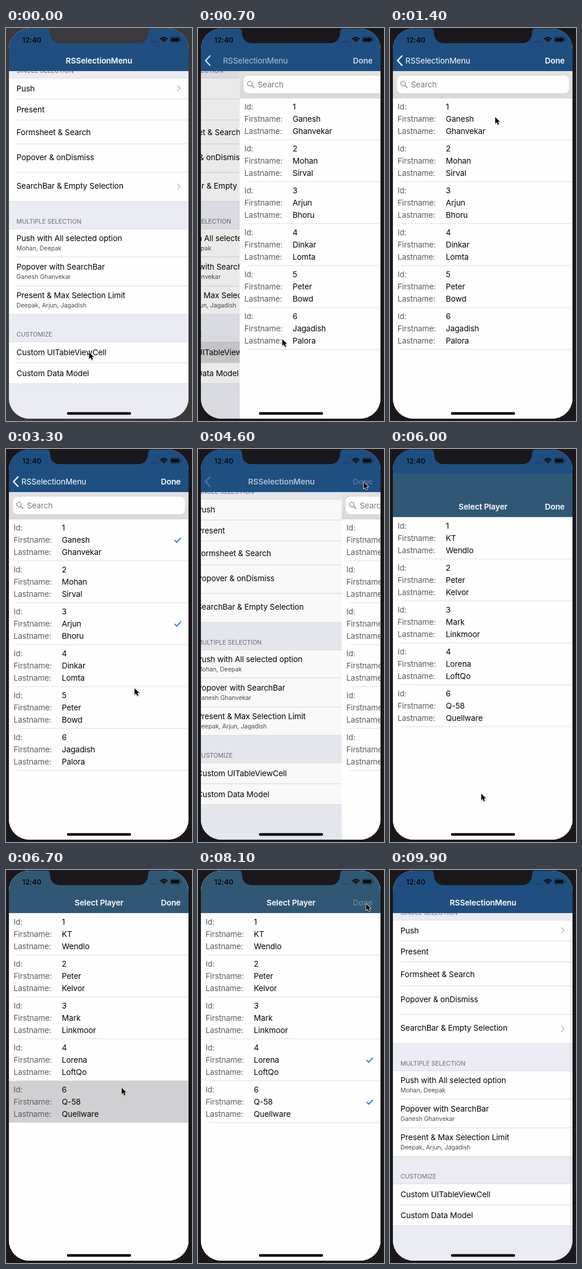
Animation, 320 px wide and 675 px high, one loop 10 s. Source, as an HTML page with a canvas:

```html
<!DOCTYPE html>
<html lang="en">
<head>
<meta charset="utf-8">
<title>Selection menu demo</title>
<style>
html, body { margin: 0; width: 100%; height: 100%; overflow: hidden; background: #1a181b; }
canvas { display: block; width: 320px; height: 675px; }
</style>
</head>
<body>
<canvas id="stage"></canvas>
<script>
const W = 320, H = 675, LOOP = 10000, STEP = 100;
const L = 5, R = 314, TOP = 1, BOTTOM = 671, NAV = 74;
const FONT = 'Inter, Roboto, "Liberation Sans", sans-serif';
const GROUP = '#ebebf3', LINE = '#dcdce0', BLUE = '#1e4f80', MODAL_BLUE = '#305874';

const canvas = document.getElementById('stage');
const ctx = canvas.getContext('2d');
const dpr = window.devicePixelRatio || 1;
canvas.width = W * dpr;
canvas.height = H * dpr;

const players = [
  [1, 'Ganesh', 'Ghanvekar'], [2, 'Mohan', 'Sirval'], [3, 'Arjun', 'Bhoru'],
  [4, 'Dinkar', 'Lomta'], [5, 'Peter', 'Bowd'], [6, 'Jagadish', 'Palora']
];
const guests = [
  [1, 'KT', 'Wendlo'], [2, 'Peter', 'Kelvor'], [3, 'Mark', 'Linkmoor'],
  [4, 'Lorena', 'LoftQo'], [6, 'Q-58', 'Quellware']
];
const menu = [
  { top: 86, ends: [122, 158, 199, 248, 298], rows: [
    ['Push', 104], ['Present', 140], ['Formsheet & Search', 179],
    ['Popover & onDismiss', 222], ['SearchBar & Empty Selection', 271.5]] },
  { head: 'MULTIPLE SELECTION', top: 345, ends: [393, 443, 492], rows: [
    ['Push with All selected option', 361, 'Mohan, Deepak'],
    ['Popover with SearchBar', 410, 'Ganesh Ghanvekar'],
    ['Present & Max Selection Limit', 459.5, 'Deepak, Arjun, Jagadish']] },
  { head: 'CUSTOMIZE', top: 539, ends: [575, 611], rows: [
    ['Custom UITableViewCell', 557], ['Custom Data Model', 593.5]] }
];
// Pointer stops: time, x, y
const path = [
  [0, 143, 557], [600, 143, 557], [1300, 181, 153], [1900, 182, 154], [2400, 204, 298],
  [2800, 206, 300], [3200, 221, 411], [3500, 222, 411], [4000, 284, 56], [4600, 285, 57],
  [5200, 153, 569], [5400, 154, 572], [5600, 156, 592], [6000, 157, 592], [6500, 199, 374],
  [6900, 199, 374], [7200, 202, 325], [7500, 203, 325], [7900, 289, 58], [8600, 290, 58],
  [9200, 334, 40], [10000, 334, 40]
];

const clamp = v => Math.max(0, Math.min(1, v));
const during = (t, a, b) => t >= a && t < b;
const smooth = p => p * p * (3 - 2 * p);
const glide = (t, start, len) => {
  const p = clamp((t - start) / len);
  return 1 - Math.pow(1 - p, 3);
};

function rect(x, y, w, h, color) {
  ctx.fillStyle = color;
  ctx.fillRect(x, y, w, h);
}

function round(x, y, w, h, r, color) {
  ctx.beginPath();
  ctx.roundRect(x, y, w, h, r);
  ctx.fillStyle = color;
  ctx.fill();
}

function stroke(points, color, width) {
  ctx.beginPath();
  points.forEach(([x, y]) => ctx.lineTo(x, y));
  ctx.strokeStyle = color;
  ctx.lineWidth = width;
  ctx.stroke();
}

// y is the middle of the capital letters
function text(s, x, y, o = {}) {
  const { size = 13.6, color = '#060608', weight = 400, gap = -0.12, align = 'left' } = o;
  ctx.font = `${weight} ${size}px ${FONT}`;
  ctx.letterSpacing = gap + 'px';
  ctx.textAlign = align;
  ctx.fillStyle = color;
  ctx.fillText(s, x, y + size * 0.364);
}

const small = (s, x, y, color) => text(s, x, y, { size: 10.5, gap: -0.04, color });
const navText = (s, x, align) => text(s, x, 56, { weight: 600, color: '#fff', align });

function faded(alpha, draw) {
  if (alpha <= 0) return;
  ctx.save();
  ctx.globalAlpha *= alpha;
  draw();
  ctx.restore();
}

function moved(x, y, draw) {
  ctx.save();
  ctx.translate(x, y);
  draw();
  ctx.restore();
}

function drawMenu(t) {
  rect(L, NAV, R - L, BOTTOM - NAV, GROUP);
  small('SINGLE SELECTION', 18, 73, '#6c6c73');
  for (const { head, top, ends, rows } of menu) {
    const last = ends[ends.length - 1];
    if (head) small(head, 18, top - 12.5, '#6c6c73');
    rect(L, top, R - L, last - top, '#fefefe');
    if (head === 'CUSTOMIZE') {
      if (during(t, 300, 1000)) rect(L, 539, R - L, 36, '#d4d4d6');
      if (during(t, 5600, 6200)) rect(L, 575, R - L, 36, '#d4d4d6');
    }
    rect(L, top - 0.5, R - L, 1, LINE);
    ends.forEach(y => {
      const x = y === last ? L : 18;
      rect(x, y - 0.5, R - x, 1, LINE);
    });
    rows.forEach(([title, y, sub]) => {
      text(title, 18, y);
      if (sub) small(sub, 18, y + 17, '#4e4e52');
    });
  }
  [103.5, 272.5].forEach(y => stroke([[295, y - 4.7], [299.5, y], [295, y + 4.7]], '#bcbcc1', 1.5));
}

function drawRows(list, top, checks, lit) {
  list.forEach((row, i) => {
    const y = top + i * 72;
    if (i === lit) rect(L, y, R - L, 72, '#d0cfd1');
    ['Id:', 'Firstname:', 'Lastname:'].forEach((label, j) => {
      text(label, 13, y + 15.5 + j * 21, { color: '#5e5e61', gap: -0.18 });
      text(String(row[j]), 96, y + 15.5 + j * 21);
    });
    if (i !== lit) rect(19, y + 71.5, R - 19, 1, '#dedee1');
    if (checks.includes(i)) {
      stroke([[290.5, y + 36.8], [293.8, y + 40.1], [300.5, y + 33]], '#0b74e5', 1.8);
    }
  });
}

function drawPlayers(t) {
  rect(L, NAV, R - L, BOTTOM - NAV, '#fefefe');
  const shade = ctx.createLinearGradient(0, NAV, 0, 120);
  shade.addColorStop(0, '#e2e1e3');
  shade.addColorStop(1, '#d9d9db');
  rect(L, NAV, R - L, 46, shade);
  rect(L, 119.5, R - L, 1, '#c2c2c5');
  round(12, 82, 296, 30, 8, '#fefefe');
  ctx.beginPath();
  ctx.arc(22.5, 95.5, 4, 0, Math.PI * 2);
  ctx.strokeStyle = '#77777c';
  ctx.lineWidth = 1.1;
  ctx.stroke();
  stroke([[25.5, 98.5], [29.5, 102.5]], '#77777c', 1.2);
  text('Search', 36, 97, { color: '#7b7b80' });

  const checks = [];
  if (t >= 1700) checks.push(0);
  if (t >= 2700) checks.push(2);
  const lit = during(t, 1500, 1700) ? 0 : during(t, 2500, 2700) ? 2 : -1;
  drawRows(players, 120, checks, lit);
}

function drawNav(t, p) {
  rect(L, TOP, R - L, NAV - TOP, BLUE);
  faded(clamp(1 - p * 1.6), () => navText('RSSelectionMenu', 160 - p * 76, 'center'));
  faded(clamp(p * 1.6 - 0.6), () => {
    text('RSSelectionMenu', 26.5 + (1 - p) * 76, 56, { color: '#fff' });
  });
  faded(p, () => {
    stroke([[20.5, 48], [13, 56], [20.5, 64]], '#fff', 2.4);
    faded(during(t, 4200, 4400) ? 0.25 : 1, () => navText('Done', 300.5, 'right'));
  });
}

function drawModal(t) {
  rect(L, TOP, R - L, BOTTOM - TOP, '#fefefe');
  const checks = [];
  if (t >= 6900) checks.push(4);
  if (t >= 7500) checks.push(3);
  const lit = during(t, 6600, 6900) ? 4 : during(t, 7300, 7500) ? 3 : -1;
  drawRows(guests, NAV, checks, lit);
  rect(L, TOP, R - L, NAV - TOP, MODAL_BLUE);
  navText('Select Player', 160, 'center');
  faded(during(t, 8000, 8300) ? 0.25 : 1, () => navText('Done', 300.5, 'right'));
}

function drawNotch(color) {
  ctx.beginPath();
  ctx.moveTo(70, 0);
  ctx.quadraticCurveTo(75.5, 1, 75.5, 7);
  ctx.bezierCurveTo(75.5, 19, 82, 26, 93, 26);
  ctx.lineTo(227, 26);
  ctx.bezierCurveTo(238, 26, 244.5, 19, 244.5, 7);
  ctx.quadraticCurveTo(244.5, 1, 250, 0);
  ctx.closePath();
  ctx.fillStyle = color;
  ctx.fill();
}

function drawStatus() {
  const ink = '#07090c';
  text('12:40', 28, 20.5, { size: 12.3, weight: 600, color: ink, gap: -0.05 });
  for (let i = 0; i < 4; i++) round(248.5 + i * 3.4, 22.5, 2, 2, 1, 'rgba(5,15,30,.4)');
  ctx.lineWidth = 1.9;
  ctx.strokeStyle = ink;
  [8.3, 5.3].forEach(r => {
    ctx.beginPath();
    ctx.arc(271.5, 24.5, r, -Math.PI * 0.75, -Math.PI * 0.25);
    ctx.stroke();
  });
  ctx.beginPath();
  ctx.moveTo(271.5, 24.5);
  ctx.arc(271.5, 24.5, 3.2, -Math.PI * 0.75, -Math.PI * 0.25);
  ctx.fillStyle = ink;
  ctx.fill();
  ctx.beginPath();
  ctx.roundRect(282.5, 15.5, 17, 9, 2.6);
  ctx.lineWidth = 0.9;
  ctx.strokeStyle = 'rgba(5,10,18,.6)';
  ctx.stroke();
  round(284, 17, 14, 6, 1.4, ink);
  round(300.7, 18.3, 1.3, 3.4, 0.7, 'rgba(5,10,18,.6)');
}

function drawPointer(t) {
  const i = path.findIndex(stop => stop[0] > t);
  const [t0, x0, y0] = path[i - 1], [t1, x1, y1] = path[i];
  const p = smooth((t - t0) / (t1 - t0));
  moved(x0 + (x1 - x0) * p, y0 + (y1 - y0) * p, () => {
    ctx.scale(0.86, 0.86);
    ctx.beginPath();
    [[0, 0], [0, 13], [3, 10.2], [5.2, 15], [7.6, 14], [5.4, 9.3], [9.4, 9.2]]
      .forEach(([x, y]) => ctx.lineTo(x, y));
    ctx.closePath();
    ctx.shadowColor = 'rgba(0,0,0,.3)';
    ctx.shadowBlur = 2 * dpr;
    ctx.shadowOffsetY = dpr;
    ctx.strokeStyle = '#fff';
    ctx.lineWidth = 1.8;
    ctx.stroke();
    ctx.shadowColor = 'transparent';
    ctx.fillStyle = '#050505';
    ctx.fill();
  });
}

function draw(t) {
  const push = t < 3000 ? glide(t, 500, 500) : 1 - glide(t, 4400, 500);
  const rise = t < 7500 ? glide(t, 5700, 500) : 1 - glide(t, 8300, 500);
  const bar = t < 7000
    ? clamp((t - 4800) / 200) * clamp((6000 - t) / 300)
    : clamp((t - 8700) / 200) * (1 - 0.85 * clamp((t - 9300) / 400));
  const bezel = t < 300 ? '#3a393c' : '#1a181b';
  const width = R - L;

  ctx.setTransform(dpr, 0, 0, dpr, 0, 0);
  ctx.lineCap = 'round';
  ctx.lineJoin = 'round';
  rect(0, 0, W, H, bezel);

  ctx.save();
  ctx.beginPath();
  ctx.roundRect(L, TOP, width, BOTTOM - TOP, 35);
  ctx.clip();
  rect(L, TOP, width, BOTTOM - TOP, GROUP);
  if (push < 1) moved(-push * width * 0.3, 0, () => drawMenu(t));
  if (push > 0) {
    if (push < 1) rect(L, NAV, width, BOTTOM - NAV, `rgba(0,0,0,${push * 0.1})`);
    moved((1 - push) * width, 0, () => drawPlayers(t));
  }
  faded(bar, () => round(310, 103.5, 2.4, 541, 1.2, '#909095'));
  drawNav(t, push);
  if (rise > 0) moved(0, (1 - rise) * (BOTTOM - TOP), () => drawModal(t));
  ctx.restore();

  drawNotch(bezel);
  drawStatus();
  round(104.8, 659.8, 110.4, 4.4, 2.2, '#050506');
  drawPointer(t);
}

const start = performance.now();
function tick() {
  const t = (performance.now() - start) % LOOP;
  draw(Math.floor(t / STEP) * STEP);
  requestAnimationFrame(tick);
}
tick();
</script>
</body>
</html>
```
